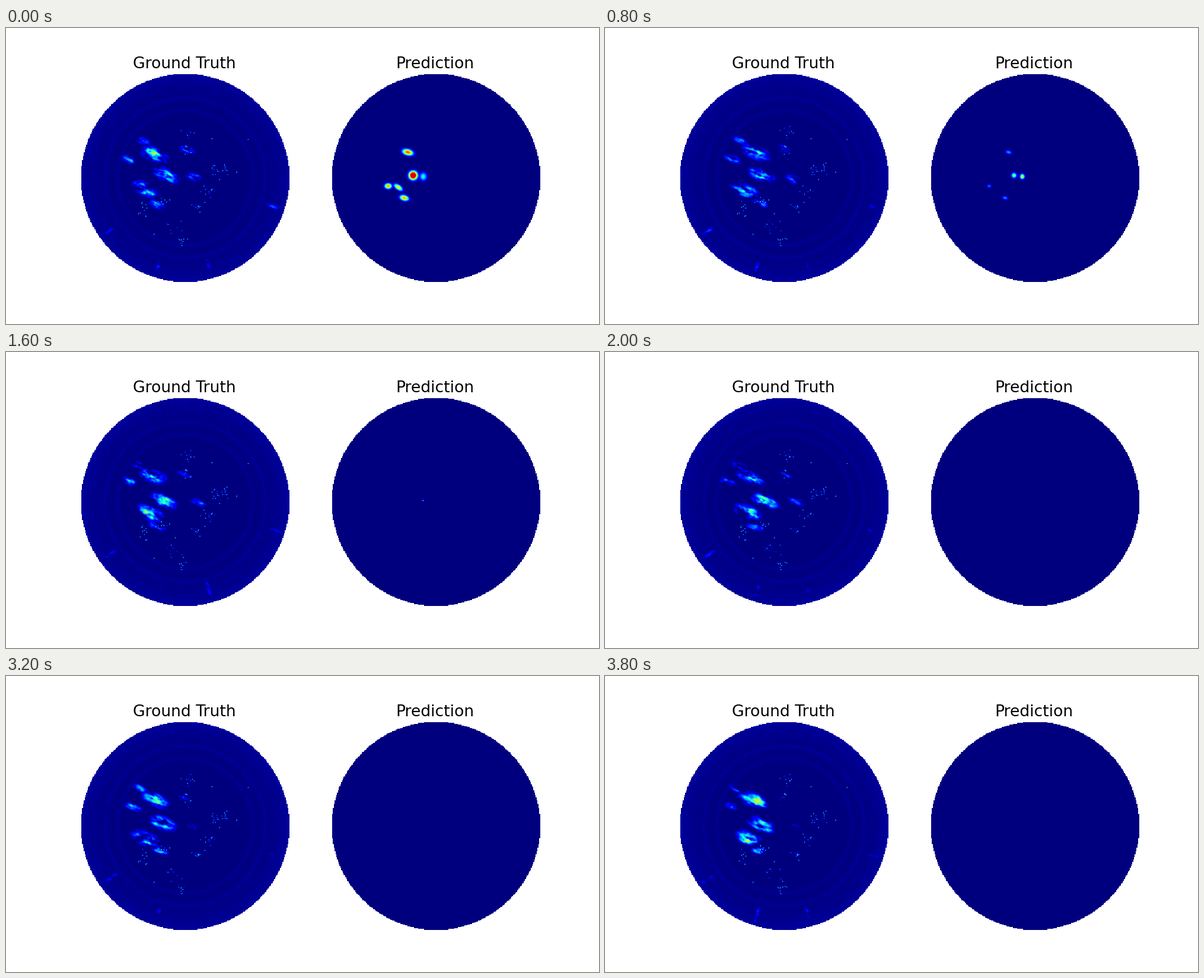
Animation, 1000 px wide and 500 px high, one loop 4000 ms. Source, as a matplotlib script:

```python
import numpy as np
import matplotlib.pyplot as plt
from matplotlib.animation import FuncAnimation

N = 256                       # cells per side of a radar grid
SCALE = 352.27 / N            # stage pixels per cell
LEFT, RIGHT, TOP = 125, 547.7, 76.4
CENTRE = np.array([301.8, 253.2])
FRAMES, STEP = 20, 200

plt.rcParams["font.size"] = 16
fig, axes = plt.subplots(1, 2, figsize=(10, 5), dpi=100)

cols, rows = np.meshgrid(np.arange(N), np.arange(N))
cells = np.hypot(cols - N / 2, rows - N / 2)
outside = cells > N / 2
radius = cells * SCALE
X, Y = (cols + .5) * SCALE, (rows + .5) * SCALE + TOP

# Echo: x, y, strength; size and tilt follow from the strength
ECHOES = [(250, 211, .42), (267, 250, .40), (238, 273, .42), (256, 296, .27),
          (302, 206, .24), (320, 254, .27), (211, 221, .26), (226, 191, .24)]
RIM_BEARINGS = (18, 75, 107, 145)
CLUTTER = [(307, 178), (366, 237), (352, 241), (322, 300), (342, 276), (299, 354),
           (277, 331), (265, 291), (303, 208), (231, 308)]
LONE_DOTS = [(408, 188), (347, 187), (388, 244), (297, 368), (250, 348)]

# Forecast cell: x, y, half length, half width, tilt, level, growth per frame
CELLS = [(677, 210, 9, 5, 15, .83, -.14), (686, 249, 7, 7, 0, 1.25, -.19),
         (703, 251, 6, 7, 0, .38, .06), (644, 267, 6, 4.5, 0, .75, -.13),
         (661, 269, 8, 4, 35, .66, -.17), (671, 287, 7.5, 4.5, 15, .75, -.12)]


def ellipse(x, y, cx, cy, a, b, tilt):
    """Squared distance from a centre, in units of the tilted half axes."""
    c, s = np.cos(np.radians(tilt)), np.sin(np.radians(tilt))
    dx, dy = x - cx, y - cy
    return ((dx * c + dy * s) / a) ** 2 + ((dy * c - dx * s) / b) ** 2


def streaks(seed, a, b, tilt):
    """Unit noise smeared along one direction."""
    white = np.random.default_rng(seed).standard_normal((N, N))
    blur = np.fft.ifftshift(np.exp(-ellipse(cols, rows, N / 2, N / 2, a, b, tilt)))
    out = np.fft.ifft2(np.fft.fft2(white) * np.fft.fft2(blur)).real
    return out / out.std()


COARSE = streaks(3, 6, 2, 24)
FINE = streaks(4, 1.8, .9, 24)
GRAIN = streaks(5, .8, .8, 0)


def scatter_dots():
    """Clutter dots as row, column, level and odds of showing."""
    rng = np.random.default_rng(11)
    spots = [(p, .5, 1) for p in LONE_DOTS]
    for centre in CLUTTER:
        for p in rng.normal(centre, (6, 6), (13, 2)):
            spots.append((p, rng.uniform(.15, .55), rng.uniform(.5, 1)))
    return [(int((y - TOP) / SCALE), int((x - LEFT) / SCALE), level, odds)
            for (x, y), level, odds in spots]


DOTS = scatter_dots()


def envelope(i):
    env = np.zeros((N, N))
    for k, (x, y, peak) in enumerate(ECHOES):
        phase = .5 * i + 2 * k
        fade = 1 - .6 * (x > 280) * i / FRAMES
        q = ellipse(X + LEFT, Y, x + 4 * np.sin(phase), y + 2 * np.cos(phase),
                    52 * peak, 24 * peak, 22)
        env = np.maximum(env, peak * fade * np.exp(-q ** 1.3))
    for k, bearing in enumerate(RIM_BEARINGS):
        angle = np.radians(bearing)
        x, y = CENTRE + 154 * np.array([np.cos(angle), np.sin(angle)])
        q = ellipse(X + LEFT, Y, x, y, 14, 3.5, bearing)
        env = np.maximum(env, (.15 + .05 * np.sin(i + k)) * np.exp(-q))
    return env


def clouds(i):
    coarse = np.roll(COARSE, (3 * i, 7 * i), (0, 1))
    fine = np.roll(FINE, (5 * i, 3 * i), (0, 1))
    v = envelope(i) * (.68 + .34 * coarse + .2 * fine) - .02
    return np.where(v > .04, np.minimum(v, .6), 0)


def backdrop(rng):
    v = .004 * (radius > 113) + .004 * (radius > 134)
    for ring in (113, 134):
        v += .014 * np.exp(-((radius - ring) / 3) ** 2)
    v += .018 * np.clip((radius - 140) / 36, 0, 1) ** 1.5
    grain = np.roll(GRAIN, tuple(rng.integers(0, N, 2)), (0, 1))
    return np.clip(v * (1 + .35 * grain), 0, 1)


def radar(i):
    rng = np.random.default_rng(100 + i)
    v = np.maximum(backdrop(rng), clouds(i))
    for r, c, level, odds in DOTS:
        if rng.random() < odds:
            v[r, c] = max(v[r, c], level)
    v[outside] = np.nan
    return v


def forecast(i):
    v = np.zeros((N, N))
    size = 1 - min(i / 9, 1) ** 1.2
    if size > 0:
        for x, y, a, b, tilt, level, growth in CELLS:
            q = ellipse(X + RIGHT, Y, x + .8 * i * (growth < 0), y, a * size, b * size, tilt)
            v = np.hypot(v, max(level + growth * i, 0) * np.exp(-q ** 1.2))
    v = np.where(v > .02, np.minimum(v, .93), 0)
    v[outside] = np.nan
    return v


views = []
for ax, title, field in zip(axes, ("Ground Truth", "Prediction"), (radar, forecast)):
    views.append((ax.imshow(field(0), cmap="jet", vmin=0, vmax=1), field))
    ax.set_title(title)
    ax.axis("off")


def update(i):
    for image, field in views:
        image.set_data(field(i))
    return [image for image, _ in views]


anim = FuncAnimation(fig, update, frames=FRAMES, interval=STEP, repeat=True, repeat_delay=0)
plt.show()
```
